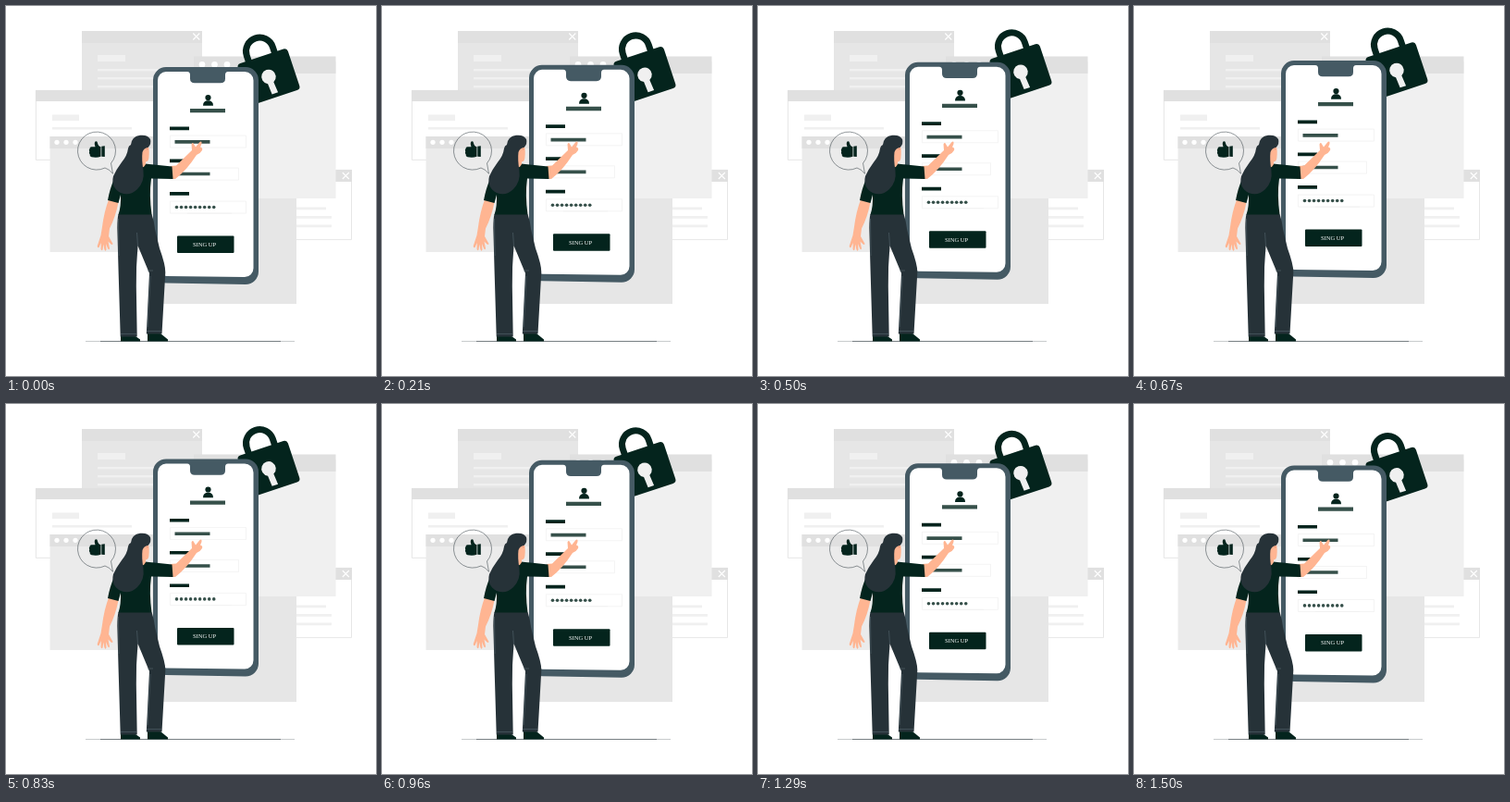
Write an HTML page that moves like this. It is 400 by 400 pixels and loops after 1.54 s.

```html
<!DOCTYPE html>
<html lang="en">
<head>
<meta charset="utf-8">
<title>Sign up</title>
<style>
html, body { margin: 0; width: 100%; height: 100%; overflow: hidden; background: #fff; }
svg { display: block; width: 100%; height: 100%; }
.dark { fill: #04241d; }
.navy { fill: #263238; }
.slate { fill: #455a64; }
.bar { fill: #36504a; }
.skin { fill: #ffb592; }
.head { fill: #e0e0e0; }
.mid { fill: #e6e6e6; }
.soft { fill: #ebebeb; }
.pale { fill: #f0f0f0; }
.white { fill: #fff; }
.frame { fill: #fff; stroke: #e0e0e0; stroke-width: .8; }
.cross { fill: none; stroke: #fff; stroke-width: 1.1; }
.field { fill: none; stroke: #f0f0f0; stroke-width: .7; }
.seam { fill: none; stroke: #55656d; stroke-width: .6; }
.thin { fill: none; stroke: #263238; stroke-width: .5; }
text { font: 6.5px "Liberation Serif", serif; fill: #fff; text-anchor: middle; }
</style>
</head>
<body>
<svg viewBox="0 0 400 400">
  <g id="windows">
    <path class="mid" d="M82 27H212V130H82z"/>
    <path class="head" d="M82 27H212V40H82z"/>
    <path class="cross" d="M202.300 29.500l7 7m0-7l-7 7"/>
    <path class="pale" d="M99 53h30v7H99zM99 68h82v2.500H99zM99 77h82v2.500H99zM99 86h82v2.500H99z"/>

    <path class="frame" d="M32.400 91.400H190V166.400H32.400z"/>
    <path class="head" d="M32 91H190V103H32z"/>
    <path class="pale" d="M50 117.500h29v6.500H50zM50 131h86v2.500H50z"/>

    <path class="soft" d="M47.500 141H166V266H47.500z"/>
    <path class="head" d="M47.500 141H166V154H47.500z"/>
    <g class="white"><circle cx="55" cy="147.300" r="2.600"/><circle cx="65" cy="147.300" r="2.600"/><circle cx="75" cy="147.300" r="2.600"/></g>

    <path class="frame" d="M260 177.400H373.500V252.600H260z"/>
    <path class="head" d="M260 177H374V190H260z"/>
    <path class="cross" d="M363.800 180l7 7m0-7l-7 7"/>
    <path class="pale" d="M300 217.500h46v2.700h-46zM300 227h52v2.700h-52zM300 236.500h52v2.700h-52z"/>

    <path class="mid" d="M168 200H314V322H168z"/>
    <path class="pale" d="M203 60H356.500V208H203z"/>
    <path class="head" d="M203 54.500H356.500V73H203z"/>
    <g class="white"><circle cx="212" cy="63.300" r="3.300"/><circle cx="225.500" cy="63.300" r="3.300"/><circle cx="239" cy="63.300" r="3.300"/></g>
  </g>

  <g id="float">
    <g transform="translate(284 77) rotate(-18.400)">
      <path d="M-15.300-16V-29.300a14.800 14.800 0 0 1 29.600 0V-16" fill="none" stroke="#04241d" stroke-width="7"/>
      <rect class="dark" x="-28.500" y="-23.500" width="57" height="47" rx="4"/>
      <path class="pale" d="M-3.300 7A7.800 7.800 0 1 1 3.300 7L4.300 19H-2.500z"/>
    </g>
    <path class="slate" d="M173 66.500H259A14 14 0 0 1 273 80.500V287.500A14 14 0 0 1 259 301.500L173 300A14 14 0 0 1 159 286V80.500A14 14 0 0 1 173 66.500z"/>
    <path class="white" d="M173 71.500H196Q199 71.500 199 75V79Q199 83.800 204 83.800H232Q237 83.800 237 79V75Q237 71.500 240 71.500H258A9.500 9.500 0 0 1 267.500 81V284A9.500 9.500 0 0 1 258 293.500L173.500 292.500A9.500 9.500 0 0 1 164 283V81A9 9.500 0 0 1 173 71.500z"/>
    <g class="dark">
      <circle cx="218.500" cy="99.500" r="3.100"/>
      <path d="M213 108.300Q213 102.800 218.500 102.800T224 108.300z"/>
      <path d="M177 131h21v3.600h-21zM177 166h21v3.600h-21zM177 201.500h21v3.600h-21z"/>
      <rect x="185" y="249" width="61.500" height="18.500" rx="1"/>
    </g>
    <g id="dots" class="bar"></g>
    <path class="bar" d="M199 111.500h38v4.300h-38zM182.500 145.500h38v3.600h-38zM182.500 180.200h38v3.600h-38z"/>
    <path class="field" d="M177.500 140.500h82v13h-82zM177.500 175.500h74v13h-74zM177.500 211.500h82v13h-82zM196 224.500h48"/>
    <text x="214.500" y="260.300">SING UP</text>
  </g>

  <path class="thin" d="M86 362.500H312" opacity=".5"/>
  <path class="thin" d="M102 362.500H297"/>

  <g id="bubble">
    <path class="thin" d="M107 175A20.500 20.500 0 1 1 113.500 170L115.500 181.300Q112 176.500 107 175z"/>
    <path class="dark" d="M103.300 151.800L106.800 151.300V163L103.300 162.700zM102.500 152.300V162.800Q98 164.500 92.500 163.300Q90.200 162.500 90.700 160.500Q89.300 159 90.200 157.300Q89.300 155.500 90.500 154.300Q90.500 152.300 92.500 152.300H96.500Q95 148 96.500 146.500Q98.300 145.500 98.800 147.500Q99.500 151.500 102.500 152.300z"/>
  </g>

  <g id="woman">
    <path class="skin" d="M111.500 208L121.500 212Q118.500 228 112 240.500L111 249L115.500 257Q115 259 113 257L110.500 254.500L112 262Q111.500 264.500 110 262L108 257L108.500 263.500Q107.500 266 106.300 263L105.300 257.500L104.500 263.500Q103 265.500 102.500 262.500L102.800 256L100.500 261Q98.800 262 98.700 259.500L102.500 248L103.800 240Q106 222 111.500 208z"/>
    <path class="dark" d="M124 357h16l5 3.500V362.500H124zM153 354h14l8 6.500V362.500H153z"/>
    <path class="navy" d="M121.500 225H157.500Q160 232 161 241L166 262Q172.500 280 172.300 288L168.500 354.500H151.800L155 289L142.500 259Q140.500 282 140.800 303L141.700 357.500H123.700L121.700 290L120.300 240Q120.300 230 121.500 225z"/>
    <path class="seam" d="M142.500 259L141.500 245M153 286h6M124 354.500h17M152 351.500h16M156 292L153 347M121.500 230L122 270"/>
    <path class="skin" d="M178 173L184 172.500L201 156L200.500 149.500Q202 146.500 203.500 150L205 152.500L209.500 147Q212 145.500 211.500 149L210 152.500Q213 153 212 156Q210.500 159 206 161Q195 178 183 187L176 187z"/>
    <path class="dark" d="M128 172Q136 167 150 170.500L179.500 173.500L180.500 187L157 186.500Q154.500 204 157.500 225.500H121.500Q124.500 217 124 204L121.500 213L110 210Q115 183 128 172z"/>
    <path class="skin" d="M142 160L144 173Q148 177 151 171L151 168.500Q154.500 168 154.500 163L154.700 160Q155 153 152.500 148Q145 148 142 160z"/>
    <path class="navy" d="M135 150Q136 141 145 139.800Q153 138.800 156 144Q157.500 149 153.500 153Q149 153.500 147.500 158Q146.500 166 148.500 178Q150 190 142 198Q134 206 124 202Q113 196 116 184Q119 177 125 169Q131 162 132 154Q132.500 151 135 150z"/>
    <path d="M151.500 155l2.500-.4" stroke="#e98b70" stroke-width=".7"/>
  </g>
</svg>
<script>
const LOOP = 1540, STEPS = 37, PEAK = 728, HALF = 770, RISE = 8.1;
const float = document.getElementById("float");

document.getElementById("dots").innerHTML = Array.from({ length: 9 }, (_, i) =>
  `<circle cx="${184.5 + i * 5.03}" cy="217.900" r="1.800"/>`).join("");

// Linear rise and fall, stepped at about 24 poses per second.
function draw(now) {
  const step = Math.floor(((now % LOOP) + 5) * STEPS / LOOP) % STEPS;
  const time = step * LOOP / STEPS;
  const lift = RISE * (1 - Math.abs(time - PEAK) / HALF);
  float.setAttribute("transform", `translate(0 ${-lift.toFixed(3)})`);
  requestAnimationFrame(draw);
}
draw(performance.now());
</script>
</body>
</html>
```
